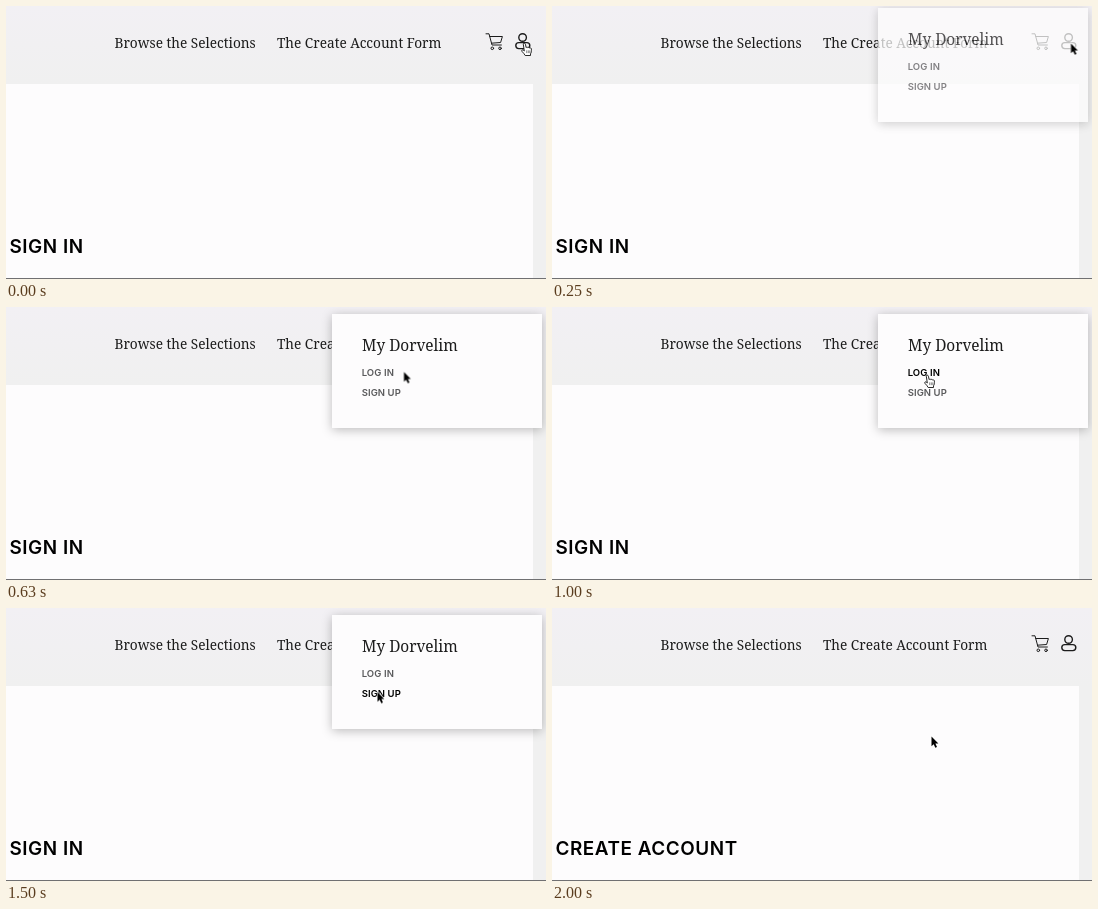
Recreate the animation shown at these times as an HTML page. Size 540 by 273 pixels, loop 2120 ms.

```html
<!DOCTYPE html>
<html lang="en">
<head>
<meta charset="utf-8">
<title>Account menu</title>
<style>
  :root { --loop: 2120ms step-end infinite; }
  html, body { margin: 0; width: 100%; height: 100%; overflow: hidden; }
  body { position: relative; background: linear-gradient(#f2f0f4, #f0f0f0 78px); }
  body * { position: absolute; white-space: nowrap; line-height: 1; }
  svg * { position: static; }

  .page { left: 0; top: 78px; width: 526.5px; height: 195px; background: #fdfcfd; }
  .rule { left: 0; top: 272px; width: 540px; height: 1px; background: #707072; }
  .nav { top: 30px; font: 13.65px/1 "Noto Serif", serif; color: #1c1c1c; }
  .icons { left: 0; top: 0; fill: none; stroke: #1c1c1c; stroke-linejoin: round; stroke-linecap: round; }

  h1 { margin: 0; left: 3.5px; top: 231.7px; font: 600 18.9px/1 Inter, sans-serif; letter-spacing: .55px; color: #000; }
  .before { animation: before var(--loop); }
  .after { opacity: 0; animation: after var(--loop); }
  @keyframes before { 0% { opacity: 1; } 76.88%, 100% { opacity: 0; } }
  @keyframes after { 0% { opacity: 0; } 76.88%, 100% { opacity: 1; } }

  .menu {
    left: 326px; top: 7px; width: 210px; height: 114px;
    background: #fdfcfd; box-shadow: 0 2px 10px rgba(0, 0, 0, .26);
    opacity: 0; animation: menu var(--loop);
  }
  .menu b { left: 30px; top: 24.3px; font: 15.4px/1 "Noto Serif", serif; color: #1c1c1c; }
  .menu span { left: 29.7px; font: 600 9.5px/1 Inter, sans-serif; letter-spacing: .08px; color: #5a5a5c; }
  .login { top: 53.7px; animation: login var(--loop); }
  .signup { top: 73.7px; animation: signup var(--loop); }
  @keyframes menu {
    0% { opacity: 0; transform: translateY(-15px); }
    6.13% { opacity: .2; transform: translateY(-12px); }
    11.79% { opacity: .74; transform: translateY(-5px); }
    17.92% { opacity: 1; transform: none; }
    76.88%, 100% { opacity: 0; transform: none; }
  }
  @keyframes login {
    0% { color: #5a5a5c; }
    47.16% { color: #000; }
    53.3%, 100% { color: #5a5a5c; }
  }
  @keyframes signup {
    0% { color: #5a5a5c; }
    58.96%, 100% { color: #000; }
  }

  .cursor { left: 0; top: 0; overflow: visible; animation: move var(--loop); }
  .arrow { animation: arrow var(--loop); }
  .hand { animation: hand var(--loop); }
  @keyframes move {
    0%, 6.13% { transform: translate(518px, 37px); }
    11.79% { transform: translate(518.5px, 37px); }
    17.92% { transform: translate(505px, 44px); }
    23.58% { transform: translate(452px, 54px); }
    29.71% { transform: translate(397.5px, 64.5px); }
    35.37%, 47.16% { transform: translate(375px, 68px); }
    53.3% { transform: translate(374px, 77px); }
    58.96% { transform: translate(373px, 84px); }
    70.75% { transform: translate(371px, 83.5px); }
    76.88% { transform: translate(371.5px, 85px); }
    88.67% { transform: translate(373px, 104px); }
    94.33%, 100% { transform: translate(379px, 128px); }
  }
  @keyframes hand {
    0% { opacity: 1; }
    11.79% { opacity: 0; }
    35.37% { opacity: 1; }
    70.75%, 100% { opacity: 0; }
  }
  @keyframes arrow {
    0% { opacity: 0; }
    11.79% { opacity: 1; }
    35.37% { opacity: 0; }
    70.75%, 100% { opacity: 1; }
  }
</style>
</head>
<body>
  <div class="page"></div>
  <div class="nav" style="left:108.5px">Browse the Selections</div>
  <div class="nav" style="left:271px">The Create Account Form</div>

  <svg class="icons" width="540" height="60">
    <path d="M480 27.8h3l3 11.2h9.4M483.8 30.5h12.6l-1.8 6-9.2 .7"/>
    <circle cx="486.3" cy="42.3" r="1.3"/>
    <circle cx="494" cy="42.3" r="1.3"/>
    <g stroke-width="1.4">
      <circle cx="516.6" cy="31.5" r="3.8"/>
      <rect x="509.8" y="36.6" width="14" height="6" rx="3"/>
    </g>
  </svg>

  <h1 class="before">SIGN IN</h1>
  <h1 class="after">CREATE ACCOUNT</h1>
  <div class="rule"></div>

  <div class="menu">
    <b>My Dorvelim</b>
    <span class="login">LOG IN</span>
    <span class="signup">SIGN UP</span>
  </div>

  <svg class="cursor" width="14" height="16">
    <path class="arrow" fill="#000" stroke="#fff" stroke-width="1.2" paint-order="stroke"
      d="M.5 .5v9.7l2.2-2 1.6 3.6 1.7-.8-1.6-3.4h3z"/>
    <g class="hand" fill="#fff" stroke="#111" stroke-width=".9" stroke-linejoin="round">
      <path d="M-.7 1.2c0-1.4 1.9-1.4 2.1 0l.7 3.4c.5-.7 1.5-.6 1.8 .1c.6-.6 1.5-.4 1.8 .4c.8-.5 1.7 0 1.7 1c.1 2.1 0 3.5-.9 4.7v1.7h-5.3c-.6-1.5-2-2.6-3.2-4.1c-.8-1.1 .3-2 1.3-1.3l1 .9z"/>
      <path stroke-width=".5" d="M2.7 7.4v2.7M4.3 7.4v2.7M5.8 7.4v2.7"/>
    </g>
  </svg>
</body>
</html>
```
